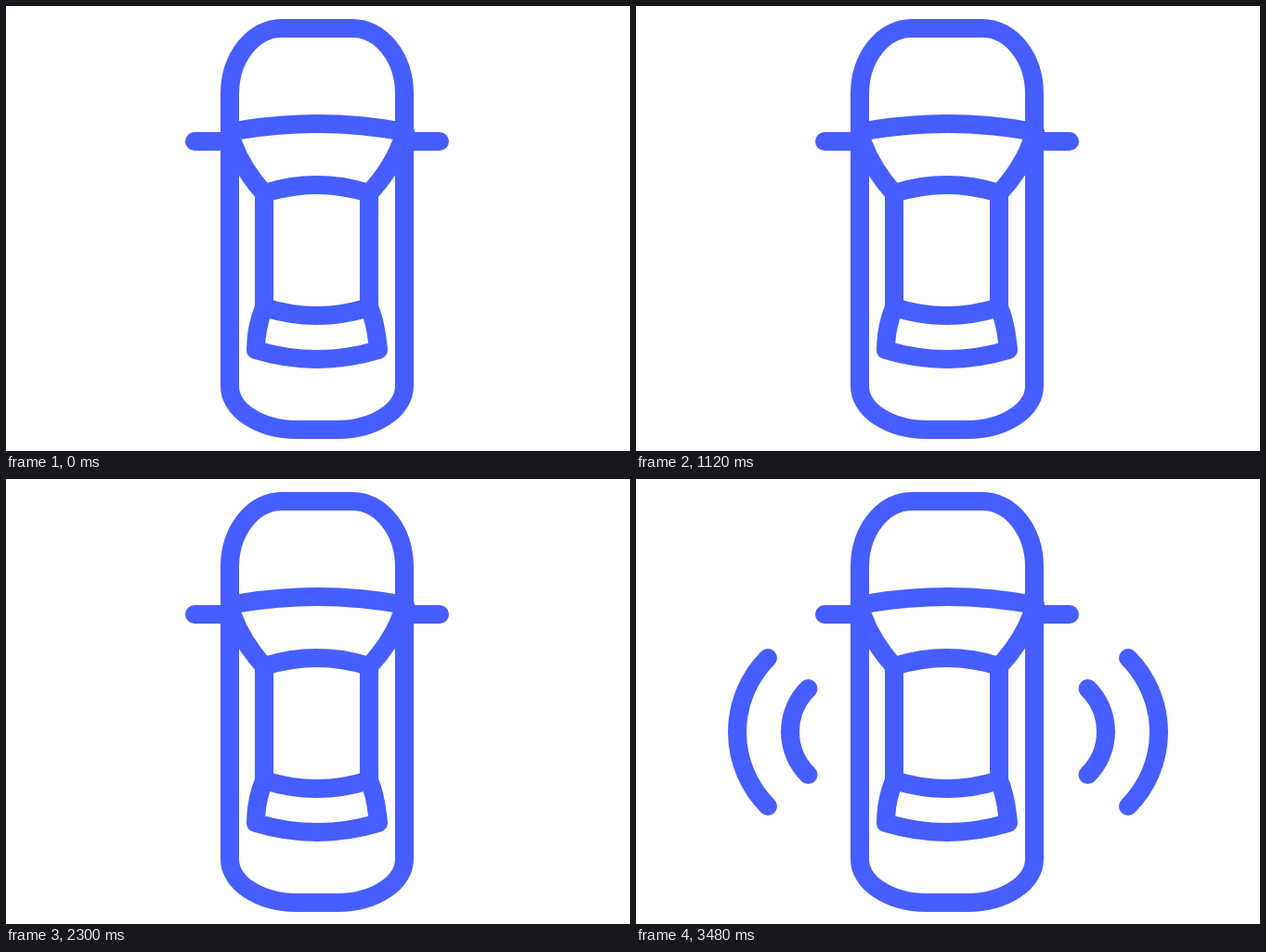
These frames come from a looping animation (672 by 480 pixels, 4.62 s). An HTML page:

```html
<!DOCTYPE html>
<html lang="en">
<head>
<meta charset="utf-8">
<title>Car sensor</title>
<style>
  html, body { margin: 0; width: 100%; height: 100%; overflow: hidden; background: #fff; }
  svg { display: block; width: 100%; height: 100%; }
  path { fill: none; stroke: #465eff; stroke-width: 20; stroke-linecap: round; stroke-linejoin: round; }
</style>
</head>
<body>
<svg viewBox="0 0 672 480">
  <!-- body and mirrors -->
  <path d="M241 95A56 71 0 0 1 297 24H373A56 71 0 0 1 429 95V410A72 47 0 0 1 357 457H313A72 47 0 0 1 241 410Z"/>
  <path d="M203 146H241M429 146H467"/>
  <!-- windscreen -->
  <path d="M241 136Q335 118 430 136M242 141Q252 173 278 202M428 141Q418 173 391 202"/>
  <!-- roof and rear window -->
  <path d="M278 325V202Q335 184 391 202V325Q335 343 278 325Q269 347 269 371Q335 391 401 371Q398 340 391 325"/>
  <path id="near" d="M185.5 226A65.2 65.2 0 0 0 185.5 319M486.5 226A65.2 65.2 0 0 1 486.5 319"/>
  <path id="far" d="M142 193A113.5 113.5 0 0 0 142 353M530 193A113.5 113.5 0 0 1 530 353"/>
</svg>
<script>
  const LOOP = 4620, PULSE = 1180, FADE = 560, PULSES = 3;
  // [time within the fade, opacity], held until the next step
  const nearSteps = [[140, .25], [210, .375], [280, .5], [420, .75], [560, 1]];
  const farSteps = [[140, .25], [210, .375], [280, .5], [350, .75], [560, 1]];
  const near = document.getElementById('near');
  const far = document.getElementById('far');

  const level = (steps, t) => steps.reduce((v, [at, alpha]) => t >= at ? alpha : v, 0);

  function draw(ms) {
    const t = ms % LOOP;
    const pulse = Math.min(PULSES - 1, Math.floor(t / PULSE));
    const local = t - pulse * PULSE;
    // every pulse but the last is cut off once both waves have faded in
    const cut = pulse < PULSES - 1 && local >= 2 * FADE;
    near.setAttribute('opacity', cut ? 0 : level(nearSteps, local));
    far.setAttribute('opacity', cut ? 0 : level(farSteps, local - FADE));
  }

  const start = performance.now();
  function tick() {
    draw(performance.now() - start);
    requestAnimationFrame(tick);
  }
  tick();
</script>
</body>
</html>
```
